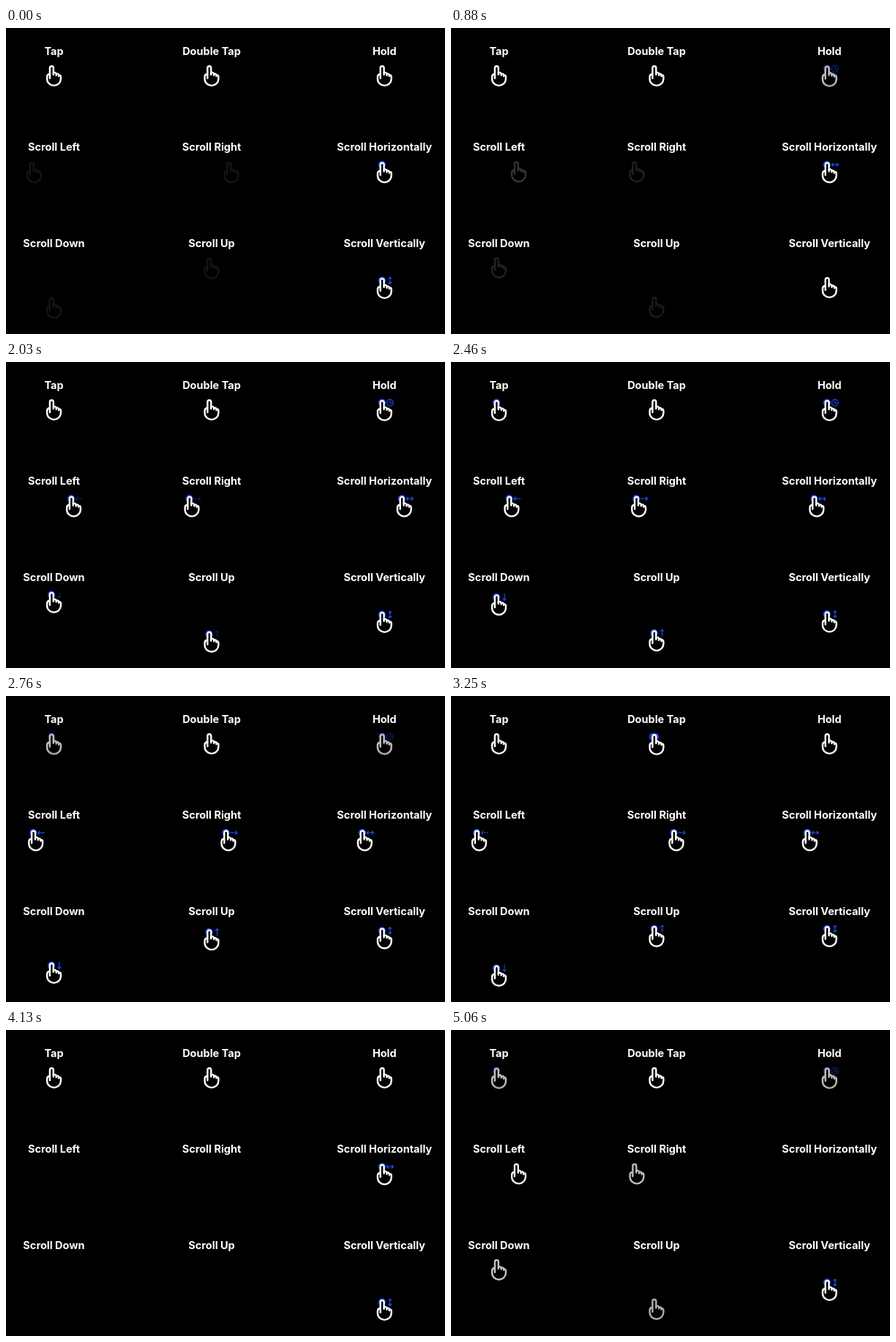
Write an HTML page that moves like this. It is 600 by 419 pixels and loops after 5.09 s.

```html
<!DOCTYPE html>
<html lang="en">
<head>
<meta charset="utf-8">
<title>Gestures</title>
<style>
  html, body { margin: 0; width: 100%; height: 100%; overflow: hidden; background: #000; }
  svg { display: block; width: 100%; height: 100%; }
  text { font: 700 14.5px Inter, sans-serif; fill: #fff; text-anchor: middle; }
  .hand { fill: #000; stroke: #fff; stroke-width: 2.4; stroke-linecap: round; stroke-linejoin: round; }
  .blue { fill: none; stroke: #1c4bf0; stroke-width: 1.6; stroke-linecap: round; stroke-linejoin: round; }
  .mark { stroke-width: 1.25; }
</style>
</head>
<body>
<svg id="stage" viewBox="0 0 600 419"></svg>
<script>
const LOOP = 5090;
const COLS = [65.5, 281, 517.3];

const HAND = `<g class="hand">
  <path d="M-5.6 3.4V-10.8a2.45 2.45 0 0 1 4.9 0V-4.1c2.1-.8 3.6-.1 3.9 1.5c1.7-.6 3.1 0 3.4 1.5c1.7-.3 2.8.6 2.8 2.3V4.3a9.4 9.1 0 0 1-18.8 0V1.2c0-2 1.3-3.5 3.8-4"/>
  <path d="M-.7-4.1V-1.6M3.2-2.6V-.8M6.6-1.1V.5" fill="none"/></g>`;
const RING = '<circle cx="-3.5" cy="-9.8" r="4.3"/>';

// Marks beside the fingertip, centred on their own origin
const MARKS = {
  none: '',
  twice: '<path d="M-15.2-4.4a6.4 6.4 0 0 0 0 8.8M-6.8-4.4a6.4 6.4 0 0 1 0 8.8"/>',
  clock: '<circle r="4.4"/><path d="M0-2.4V.2L1.7 1.2"/>',
  left: '<path d="M4.5 0h-9M-2.3-2.2L-4.5 0l2.2 2.2"/>',
  right: '<path d="M-4.5 0h9M2.3-2.2L4.5 0l-2.2 2.2"/>',
  down: '<path d="M0-4.5v9M-2.2 2.3L0 4.5l2.2-2.2"/>',
  up: '<path d="M0 4.5v-9M-2.2-2.3L0-4.5l2.2 2.2"/>',
  across: '<path d="M-4.6 0h9.2M-2.6-2L-4.6 0l2 2M2.6-2L4.6 0l-2 2"/>',
  upright: '<path d="M0-4.6v9.2M-2-2.6L0-4.6l2 2M-2 2.6L0 4.6l2-2"/>'
};

const clamp = v => Math.min(1, Math.max(0, v));
const linear = p => p;
const always = v => () => v;

// cubic-bezier(.25, .1, .25, 1)
function ease(x) {
  let lo = 0, hi = 1, s = x;
  for (let i = 0; i < 20; i++) {
    const u = 1 - s;
    if (0.75 * u * u * s + 0.75 * u * s * s + s ** 3 < x) lo = s; else hi = s;
    s = (lo + hi) / 2;
  }
  const u = 1 - s;
  return 0.3 * u * u * s + 3 * u * s * s + s ** 3;
}

// keys: [start, duration, value]
function track(first, keys, curve = linear) {
  return t => {
    let v = first;
    for (const [start, dur, to] of keys) {
      if (t < start) break;
      v += (to - v) * curve(dur ? clamp((t - start) / dur) : 1);
    }
    return v;
  };
}

function tap(label, col, mark, presses) {
  return { label, col, row: 0, mark, y: 65.5, dx: 0, dy: 0,
    alpha: always(1), press: track(0, presses), arrow: always(1), move: always(0) };
}

function swipe(label, col, row, mark, lag, geo) {
  return { label, col, row, mark, ...geo,
    alpha: track(1, [[-460, 500, 0], [780 + lag, 500, 1],
      [3350, 500, 0], [4590 + 2.5 * lag, 500, 1]]),
    press: track(1, [[400, 0, 0], [1300 + lag, 500, 1], [4300, 0, 0]]),
    arrow: track(0, [[1820 + lag, 500, 1], [3150 + lag, 400, 0]]),
    move: track(1, [[400, 0, -1], [2388 + lag, 500, 1], [4300, 0, -1]], ease) };
}

const gestures = [
  tap('Tap', 0, 'none', [[2040, 400, 1], [2540, 400, 0], [4860, 400, 1]]),
  tap('Double Tap', 1, 'twice', [[2800, 350, 1], [3400, 350, 0]]),
  tap('Hold', 2, 'clock', [[680, 400, 1], [2550, 400, 0], [4860, 400, 1]]),
  swipe('Scroll Left', 0, 1, 'left', 0, { y: 197, dx: -27, dy: 0 }),
  swipe('Scroll Right', 1, 1, 'right', 40, { y: 197, dx: 27, dy: 0 }),
  { label: 'Scroll Horizontally', col: 2, row: 1, mark: 'across', y: 197, dx: 27, dy: 0,
    alpha: track(1, [[4520, 460, 0]]),
    press: always(1),
    arrow: track(0, [[55, 500, 1]]),
    move: track(0, [[1150, 500, 1], [2200, 500, -1], [3320, 500, 0]], ease) },
  swipe('Scroll Down', 0, 2, 'down', 35, { y: 355.3, dx: 0, dy: 27 }),
  swipe('Scroll Up', 1, 2, 'up', 50, { y: 355.3, dx: 0, dy: -27 }),
  { label: 'Scroll Vertically', col: 2, row: 2, mark: 'upright', y: 355.5, dx: 0, dy: 27,
    alpha: always(1),
    press: track(1, [[150, 400, 0], [900, 400, 1]]),
    arrow: track(1, [[50, 400, 0], [1300, 500, 1]]),
    move: track(0, [[2445, 500, -1], [3450, 500, 1], [4520, 500, 0]], ease) }
];

const stage = document.getElementById('stage');
stage.innerHTML = gestures.map(g => `
  <text x="${COLS[g.col]}" y="${36.5 + 131.5 * g.row}">${g.label}</text>
  <g class="body">
    <g class="plain">${HAND}</g>
    <g class="pressed">
      <g class="blue">${RING}<g class="mark" transform="translate(7.5 -9.8)">${MARKS[g.mark]}</g></g>
      <g transform="translate(0 1)">${HAND}</g>
    </g>
  </g>`).join('');

stage.querySelectorAll('.body').forEach((body, i) => {
  const g = gestures[i];
  g.body = body;
  for (const part of ['plain', 'pressed', 'mark']) g[part + 'El'] = body.querySelector('.' + part);
});

function draw(t) {
  for (const g of gestures) {
    const m = g.move(t), p = g.press(t);
    g.body.setAttribute('transform', `translate(${COLS[g.col] + g.dx * m} ${g.y + g.dy * m})`);
    g.body.setAttribute('opacity', g.alpha(t));
    g.plainEl.setAttribute('opacity', 1 - p);
    g.pressedEl.setAttribute('opacity', p);
    g.markEl.setAttribute('opacity', g.arrow(t));
  }
}

const begin = performance.now();
function tick() {
  draw((performance.now() - begin) % LOOP);
  requestAnimationFrame(tick);
}
draw(0);
requestAnimationFrame(tick);
</script>
</body>
</html>
```
